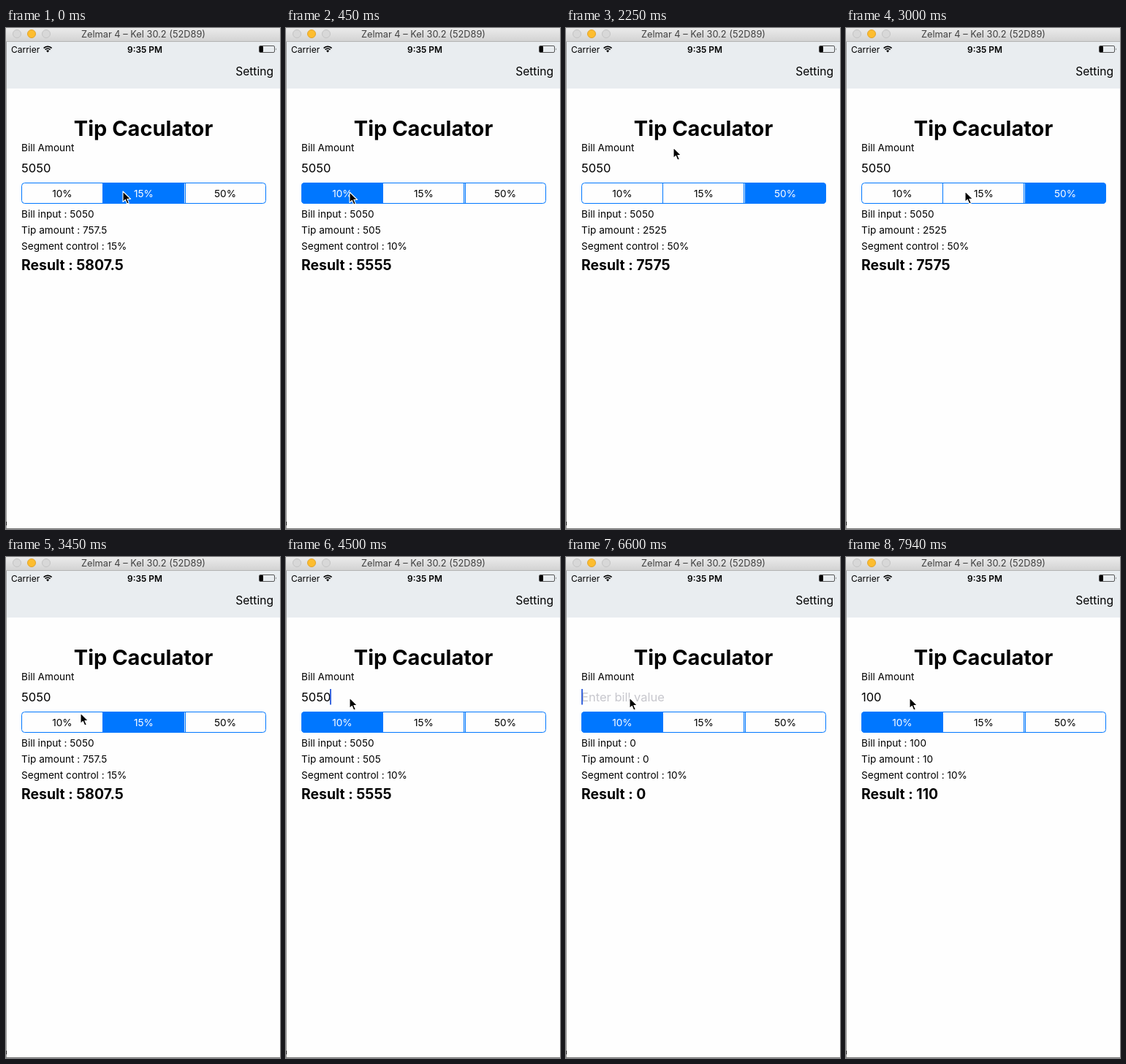
These frames come from a looping animation (375x687 px, 8 s). An HTML page:

```html
<!DOCTYPE html>
<html lang="en">
<head>
<meta charset="utf-8">
<title>Tip calculator</title>
<style>
html, body { margin: 0; width: 100%; height: 100%; overflow: hidden; background: #fefefe; }
svg { display: block; width: 375px; height: 687px; }
text { font: 13.6px Inter, Roboto, sans-serif; white-space: pre; }
.mid, #segments text { text-anchor: middle; }
.entry { font-size: 16.5px; }
</style>
</head>
<body>
<svg viewBox="0 0 375 687">
  <defs>
    <linearGradient id="chrome" x2="0" y2="1">
      <stop stop-color="#ebebeb"/><stop offset="1" stop-color="#d3d3d3"/>
    </linearGradient>
    <clipPath id="pill"><rect x="21" y="212" width="335" height="29" rx="4.5"/></clipPath>
  </defs>
  <rect width="375" height="687" fill="#fefefe"/>

  <!-- window bar -->
  <rect width="375" height="18" fill="url(#chrome)"/>
  <path d="M0 18.5H375" stroke="#b4b4b4"/>
  <g fill="#d8d8d8" stroke="#c4c4c4">
    <circle cx="15" cy="8" r="5.5"/>
    <circle cx="35" cy="8" r="5.5" fill="#fdbd2f" stroke="#e0a32c"/>
    <circle cx="55" cy="8" r="5.5"/>
  </g>
  <text class="mid" x="188" y="13" fill="#404040" style="font-size:12.8px">Zelmar 4 – Kel 30.2 (52D89)</text>

  <!-- status and navigation bars -->
  <rect y="19" width="375" height="64" fill="#e9edf0"/>
  <text x="7" y="33.5" style="font-size:12px">Carrier</text>
  <g fill="none" stroke="#000" stroke-width="1.7">
    <path d="M51.6 27.6a7.8 7.8 0 0 1 11 0M53.6 29.7a5 5 0 0 1 7 0"/>
    <path d="M57.1 33.4l-2-2.1a2.9 2.9 0 0 1 4 0z" fill="#000" stroke="none"/>
  </g>
  <text class="mid" x="190" y="33.5" style="font-size:11.9px;font-weight:600">9:35 PM</text>
  <rect x="346.5" y="24.5" width="21" height="9" rx="1.5" fill="none" stroke="#444" stroke-width=".9"/>
  <rect x="347" y="25" width="5" height="8" rx="1"/>
  <path d="M369 27.5v3q1.4-1.5 0-3" fill="#333"/>
  <text x="366" y="64.5" text-anchor="end" style="font-size:15.6px">Setting</text>

  <!-- form -->
  <text class="mid" x="188" y="148" style="font-size:29px;font-weight:700">Tip Caculator</text>
  <text x="21" y="168.5">Bill Amount</text>
  <text class="entry" id="hint" x="21" y="197.5" fill="#c7c7cd">Enter bill value</text>
  <text class="entry" id="field" x="21" y="197.5"></text>
  <rect id="caret" y="181" width="2" height="21.5" fill="#3b67dd"/>
  <g id="segments">
    <rect id="fill" y="212" width="112" height="29" fill="#0077ff" clip-path="url(#pill)"/>
    <path d="M132.5 212v29M243.5 212v29M245.5 212v29" stroke="#0077ff"/>
    <path d="M244.5 213v27" stroke="#d5e8fb"/>
    <rect x="21.5" y="212.5" width="334" height="28" rx="4" fill="none" stroke="#0077ff"/>
    <text x="77" y="231.5">10%</text>
    <text x="188.5" y="231.5">15%</text>
    <text x="300" y="231.5">50%</text>
  </g>
  <text id="input" x="21" y="259.5"></text>
  <text id="tip" x="21" y="281.5"></text>
  <text id="control" x="21" y="303.5"></text>
  <text id="result" x="21" y="331.5" style="font-size:19.4px;font-weight:700"></text>

  <!-- window edges -->
  <path d="M.5 19V687" stroke="#9b9b9b"/>
  <path d="M0 686.5H375" stroke="#777"/>
  <path d="M.5 677v5" stroke="#222"/>

  <path id="mouse" d="M0 0V14.5L3.3 11.4 5.7 17 8.3 15.9 5.9 10.5H10.6Z"
        stroke="#fff" stroke-width="1.1" stroke-linejoin="round"/>
</svg>
<script>
const LOOP = 8000;
const STEP = 150;
const rates = [10, 15, 50];

// Pointer stops: time, x, y
const stops = [
  [0, 160, 224], [450, 87, 225], [600, 87, 225], [1200, 288, 226],
  [1650, 193, 197], [2250, 147, 164], [2550, 41, 188], [2700, 98, 190],
  [3000, 163, 224], [3450, 102, 214], [3600, 102, 214], [4050, 87, 193]
];
const clicks = [300, 1350, 3150, 3900];
const picks = [1, 0, 2, 1, 0];
const caretResets = [4500, 4950, 6600, 7190];

const $ = id => document.getElementById(id);
const clamp = (v, lo, hi) => Math.min(hi, Math.max(lo, v));
const ease = k => k * k * (3 - 2 * k);
const labels = document.querySelectorAll("#segments text");

// The pointer glides between stops, seen once per step.
function pointerAt(t) {
  const now = Math.floor(t / STEP) * STEP;
  const next = stops.findIndex(stop => stop[0] > now);
  if (next < 0) return stops.at(-1).slice(1);
  const [t0, x0, y0] = stops[next - 1];
  const [t1, x1, y1] = stops[next];
  const k = ease((now - t0) / (t1 - t0));
  return [x0 + (x1 - x0) * k, y0 + (y1 - y0) * k];
}

// One key press per step: erase to one digit, clear, then type.
function billAt(t) {
  const keys = start => clamp(Math.floor((t - start) / STEP), 0, 3);
  return t < 6600 ? "5050".slice(0, 4 - keys(4500)) : "100".slice(0, keys(6890));
}

// Solid after a key press, then blinking with a short fade each way.
function caretAt(t) {
  const reset = caretResets.findLast(time => time <= t);
  if (!reset) return 0;
  const idle = (t - reset) % 1200;
  if (idle < 600) return 1;
  return idle >= 750 && idle < 1050 ? 0 : .6;
}

function draw(t) {
  const pick = picks[clicks.filter(time => time <= t).length];
  const rate = rates[pick];
  const bill = billAt(t);
  const tip = +(bill * rate / 100).toFixed(2);

  $("mouse").setAttribute("transform", `translate(${pointerAt(t)})`);
  $("fill").setAttribute("x", 21 + pick * 111.5);
  labels.forEach((label, i) => label.style.fill = i === pick ? "#fff" : "#000");

  $("field").textContent = bill;
  $("hint").style.opacity = bill ? 0 : 1;
  const width = bill ? $("field").getComputedTextLength() : 1;
  $("caret").setAttribute("x", Math.round(20 + width));
  $("caret").style.opacity = caretAt(t);

  $("input").textContent = "Bill input : " + +bill;
  $("tip").textContent = "Tip amount : " + tip;
  $("control").textContent = `Segment control : ${rate}%`;
  $("result").textContent = "Result : " + (+bill + tip);
}

function tick() {
  draw(performance.now() % LOOP);
  requestAnimationFrame(tick);
}
tick();
</script>
</body>
</html>
```
